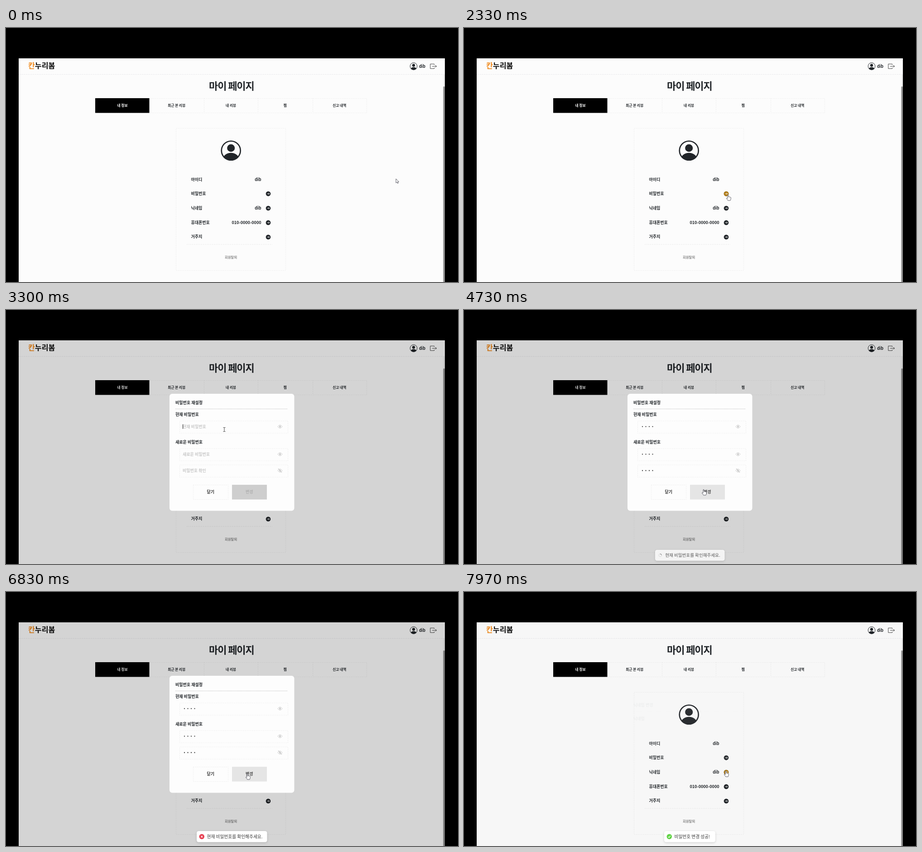
Write an HTML page with a canvas that moves like this. It is 998 by 561 pixels and loops after 8 s.

```html
<!DOCTYPE html>
<html lang="ko">
<head>
<meta charset="utf-8">
<style>
  html, body { margin: 0; width: 100%; height: 100%; overflow: hidden; background: #000; }
  canvas { display: block; width: 998px; height: 561px; }
</style>
</head>
<body>
<canvas id="stage"></canvas>
<script>
const W = 998, H = 561, LOOP = 8000;
const FONT = '"Noto Sans CJK KR", "Noto Sans CJK JP", "Noto Sans CJK", sans-serif';
const INK = '#212529', GOLD = '#b07c16', FAINT = '#ececec';
const USER = 'dib';

const cv = document.getElementById('stage');
const c = cv.getContext('2d');
const dpr = window.devicePixelRatio || 1;
cv.width = W * dpr;
cv.height = H * dpr;

const clamp = v => Math.max(0, Math.min(1, v));
const ramp = (t, a, b) => clamp((t - a) / (b - a));
const smooth = v => v * v * (3 - 2 * v);
const easeOut = v => 1 - (1 - v) ** 3;

function text(s, x, y, size, { color = INK, weight = 900, align = 'left', gap = 0 } = {}) {
  c.font = `${weight} ${size}px ${FONT}`;
  c.letterSpacing = gap + 'px';
  c.textAlign = align;
  c.fillStyle = color;
  c.fillText(s, x, y + size * 0.37);
}

function rect(x, y, w, h, color) {
  c.fillStyle = color;
  c.fillRect(x, y, w, h);
}

function round(x, y, w, h, r, color) {
  c.fillStyle = color;
  c.beginPath();
  c.roundRect(x, y, w, h, r);
  c.fill();
}

function disc(x, y, r, color) {
  c.fillStyle = color;
  c.beginPath();
  c.arc(x, y, r, 0, 7);
  c.fill();
}

function line(points, color, width = 1, dash = []) {
  c.strokeStyle = color;
  c.lineWidth = width;
  c.setLineDash(dash);
  c.beginPath();
  points.forEach(([x, y], i) => i ? c.lineTo(x, y) : c.moveTo(x, y));
  c.stroke();
  c.setLineDash([]);
}

function frame(x, y, w, h, color = FAINT) {
  c.strokeStyle = color;
  c.lineWidth = 1;
  c.setLineDash([2, 2]);
  c.strokeRect(x + 0.5, y + 0.5, w, h);
  c.setLineDash([]);
}

function avatar(x, y, r) {
  c.save();
  c.beginPath();
  c.arc(x, y, r, 0, 7);
  c.clip();
  disc(x, y - r * 0.25, r * 0.38, INK);
  c.beginPath();
  c.ellipse(x, y + r * 0.83, r * 0.78, r * 0.6, 0, 0, 7);
  c.fill();
  c.restore();
  c.strokeStyle = INK;
  c.lineWidth = r * 0.12;
  c.beginPath();
  c.arc(x, y, r * 0.94, 0, 7);
  c.stroke();
}

function goButton(y, hover) {
  const x = 579;
  disc(x, y, 5.3, INK);
  c.save();
  c.globalAlpha *= hover;
  disc(x, y, 5.3, GOLD);
  c.restore();
  line([[x - 2.7, y], [x + 2.7, y]], '#fff', 0.9);
  line([[x + 0.6, y - 2.1], [x + 2.7, y], [x + 0.6, y + 2.1]], '#fff', 0.9);
}

function header() {
  text('칸', 49, 83.5, 16.2, { color: '#f08a1d' });
  text('누리봄', 63.8, 83.5, 16.2, { color: '#0c0c0c' });
  avatar(900, 84.5, 8.3);
  text(USER, 912, 84.5, 9, { gap: -0.2 });
  line([[945.5, 81.5], [945.5, 79.5], [936.8, 79.5], [936.8, 89.7], [945.5, 89.7], [945.5, 87.5]], '#333', 0.9);
  line([[941, 84.6], [950.5, 84.6]], '#333', 0.9);
  line([[948, 82], [950.6, 84.6], [948, 87.2]], '#333', 0.9);
  line([[28, 102.5], [965, 102.5]], '#e2e2e6', 1, [2, 2]);
}

function tabs() {
  frame(197, 155, 599, 32);
  for (const x of [437, 556, 677]) line([[x + 0.5, 155], [x + 0.5, 187]], FAINT, 1, [2, 2]);
  rect(197, 155, 119.5, 32.5, '#000');
  ['내 정보', '최근 본 리뷰', '내 리뷰', '찜', '신고 내역'].forEach((s, i) =>
    text(s, 257 + i * 119.8, 171, 7.7, { align: 'center', color: i ? INK : '#fff' }));
}

function page(t) {
  rect(28, 67, 941, 494, '#fcfcfc');
  header();
  rect(965, 102, 4, 459, '#f0f0f0');
  round(965.3, 129, 3.7, 440, 2, '#929292');
  text('마이 페이지', 448, 128, 22, { gap: -1.1 });
  tabs();

  frame(375, 221, 242, 314);
  avatar(496.7, 270.7, 22.3);
  const rows = [['아이디', USER], ['비밀번호', ''], ['닉네임', USER], ['휴대폰번호', '010-0000-0000'], ['거주지', '']];
  const hover = [0, t < 2950 ? ramp(t, 1670, 1930) : 0, ramp(t, 7700, 7850), 0, 0];
  rows.forEach(([name, value], i) => {
    const y = i ? 333.5 + i * 31.9 : 335;
    text(name, 408.5, y, 9);
    text(value, 563.5, y, 9, { align: 'right', weight: 700 });
    if (i) goButton(y + 0.7, hover[i]);
  });
  line([[399, 478], [588, 478]], '#e8e8e8', 1, [2, 2]);
  text('회원탈퇴', 483, 506, 7.4, { color: '#8c8c8c', weight: 700 });
}

function eye(y, slashed) {
  const x = 605, col = '#c6c6c6';
  c.strokeStyle = col;
  c.lineWidth = 0.9;
  c.beginPath();
  c.moveTo(x - 5, y);
  c.quadraticCurveTo(x, y - 7, x + 5, y);
  c.quadraticCurveTo(x, y + 7, x - 5, y);
  c.stroke();
  disc(x, y, 1.9, col);
  if (slashed) line([[x - 4, y - 4.5], [x + 4, y + 4.5]], col, 1.1);
}

function field(y, hint, count, caret, slashed) {
  frame(383, y - 13, 239, 27);
  if (count) {
    for (let i = 0; i < count; i++) disc(394 + i * 7.5, y, 1.1, '#222');
  } else {
    text(hint, 390, y, 9, { color: '#c8c8c8', weight: 700 });
  }
  if (caret) rect(390 + (count ? 3 + count * 7.5 : 0), y - 5, 1, 10, '#222');
  eye(y, slashed);
}

const typed = (t, a, b) => Math.floor(ramp(t, a, b) * 4);

function passwordModal(t) {
  const first = t < 5760 ? typed(t, 3400, 3650) : typed(t, 5800, 6180);
  const second = typed(t, 3800, 4020), third = typed(t, 4120, 4340);
  const ready = third === 4 && first === 4;
  const focus = t < 3720 ? 0 : t < 4060 ? 1 : t < 4500 ? 2 : t > 5700 && t < 6600 ? 0 : -1;
  const blink = t % 1000 < 600;

  round(361, 185, 275.5, 258.5, 6, '#fdfdfd');
  text('비밀번호 재설정', 374, 204.5, 9);
  line([[374, 218.5], [622, 218.5]], '#b4b4b4', 1, [1, 1]);
  text('현재 비밀번호', 374, 231, 9);
  field(257.5, '현재 비밀번호', first, focus === 0 && blink);
  text('새로운 비밀번호', 374, 292, 9);
  field(318.5, '새로운 비밀번호', second, focus === 1 && blink);
  field(354.7, '비밀번호 확인', third, focus === 2 && blink, true);

  frame(413, 386, 77, 32);
  text('닫기', 451.7, 402, 9, { align: 'center', color: '#333', weight: 700 });
  rect(499, 386, 77, 32.5, ready ? '#e5e5e5' : '#cecece');
  text('변경', 537.3, 402, 9, { align: 'center', color: ready ? '#4a4a4a' : '#b0b0b0', weight: 700 });
}

function nicknameModal() {
  round(361, 231, 275.5, 167, 6, '#fdfdfd');
  text('닉네임 변경', 374, 250, 9);
  line([[374, 264.5], [622, 264.5]], '#b4b4b4', 1, [1, 1]);
  text('닉네임', 374, 280, 9);
}

function layer(alpha, draw) {
  if (alpha <= 0) return;
  c.save();
  c.globalAlpha = alpha;
  draw();
  c.restore();
}

function shade(alpha) {
  layer(alpha * 0.16, () => rect(28, 67, 941, 494, '#000'));
}

function toast(t, start, end, x, w, msg, ok) {
  if (t < start || t > end) return;
  const inn = ramp(t, start, start + 250), out = ramp(t, end - 150, end);
  const e = easeOut(inn) * (1 - out * out);
  const icon = easeOut(ramp(t, start + 220, start + 420));
  const cy = 540.3, ix = x + 11.3;
  c.save();
  c.globalAlpha = (0.5 + 0.5 * inn) * (1 - out);
  c.translate(x + w / 2, cy + (1 - e) * 48);
  c.scale(0.6 + 0.4 * e, 0.6 + 0.4 * e);
  c.translate(-x - w / 2, -cy);
  c.shadowColor = 'rgba(0,0,0,.16)';
  c.shadowBlur = 5 * dpr;
  c.shadowOffsetY = 1.5 * dpr;
  round(x, 528, w, 24.5, 4.5, '#fff');
  c.shadowColor = 'transparent';
  text(msg, x + 22.5, cy, 9.7, { color: '#3a3a3a', weight: 400 });

  c.translate(ix, cy);
  if (icon < 1) {
    c.strokeStyle = '#d5d5d5';
    c.lineWidth = 1;
    c.beginPath();
    c.arc(0, 0, 3.2, 0, 7);
    c.stroke();
    c.strokeStyle = '#616161';
    const a = t / 1000 * 2 * Math.PI;
    c.beginPath();
    c.arc(0, 0, 3.2, a, a + 1.57);
    c.stroke();
  }
  if (icon > 0) {
    c.scale(icon, icon);
    disc(0, 0, 5.7, ok ? '#61d345' : '#e63e50');
    if (ok) {
      line([[-2.5, 0.2], [-0.6, 2], [2.6, -2]], '#fff', 1.3);
    } else {
      line([[-2, -2], [2, 2]], '#fff', 1.2);
      line([[2, -2], [-2, 2]], '#fff', 1.2);
    }
  }
  c.restore();
}

// Pointer stops: time, x, y
const stops = [
  [0, 861, 333], [30, 861, 333], [330, 544, 359], [830, 544, 359], [1600, 583, 368],
  [2720, 583, 368], [2790, 586, 371.5], [2950, 586, 371.5], [3230, 482, 264], [4360, 482, 264],
  [4540, 529, 396], [5430, 529, 396], [5700, 396, 257], [6270, 396, 257], [6600, 533, 401],
  [7200, 533, 401], [7700, 578, 395], [8000, 578, 395]
];

function pointerAt(t) {
  const i = Math.max(1, stops.findIndex(s => s[0] > t));
  const [t0, x0, y0] = stops[i - 1], [t1, x1, y1] = stops[i];
  const k = smooth(ramp(t, t0, t1));
  return [x0 + (x1 - x0) * k, y0 + (y1 - y0) * k];
}

const ARROW = new Path2D('M0 0V9.2L2.2 7.3L3.7 10.3L5.1 9.6L3.7 6.8H6.5Z');
const HAND = new Path2D('M-1 1Q0-.6 1 1V5Q2 4.2 2.9 5.2Q4 4.6 4.6 5.6Q6 5.2 6.2 6.8V9.5Q6 11 5 13H-.2Q-1.4 10.8-3.4 8.8Q-4 7.4-2.4 7.4L-1 8.4Z');

function pointer(t) {
  const [x, y] = pointerAt(t);
  const open = t > 2770 && t < 7020;
  const onButton = x > 499 && x < 576 && y > 386 && y < 418;
  const onGo = Math.hypot(x - 579, y - 366) < 7 || Math.hypot(x - 579, y - 398) < 7;
  const onField = x > 383 && x < 622 && [257.5, 318.5, 354.7].some(f => Math.abs(y - f) < 17.5);
  c.save();
  c.translate(x, y);
  if (open && onField) {
    line([[-2.5, -4.5], [-0.7, -4.5], [0, -4], [0.7, -4.5], [2.5, -4.5]], '#333', 0.9);
    line([[0, -4], [0, 4]], '#333', 0.9);
    line([[-2.5, 4.5], [-0.7, 4.5], [0, 4], [0.7, 4.5], [2.5, 4.5]], '#333', 0.9);
  } else {
    const shape = (open ? onButton : onGo) ? HAND : ARROW;
    c.fillStyle = '#fff';
    c.strokeStyle = '#50505a';
    c.lineWidth = 0.9;
    c.lineJoin = 'round';
    c.fill(shape);
    c.stroke(shape);
  }
  c.restore();
}

function draw(t) {
  c.setTransform(dpr, 0, 0, dpr, 0, 0);
  rect(0, 0, W, H, '#000');
  c.save();
  c.beginPath();
  c.rect(28, 67, 941, 494);
  c.clip();
  page(t);
  const closing = 1 - ramp(t, 7000, 7200);
  shade(ramp(t, 2745, 2945) * closing);
  layer(ramp(t, 2770, 2970) * closing, () => passwordModal(t));
  shade(ramp(t, 7945, 8145));
  layer(ramp(t, 7962, 8162), nicknameModal);
  toast(t, 4560, 7150, 421, 155.5, '현재 비밀번호를 확인해주세요.', false);
  toast(t, 7100, 9000, 442, 113, '비밀번호 변경 성공!', true);
  pointer(t);
  c.restore();
}

const begin = performance.now();
function tick() {
  draw((performance.now() - begin) % LOOP);
  requestAnimationFrame(tick);
}
tick();
</script>
</body>
</html>
```
